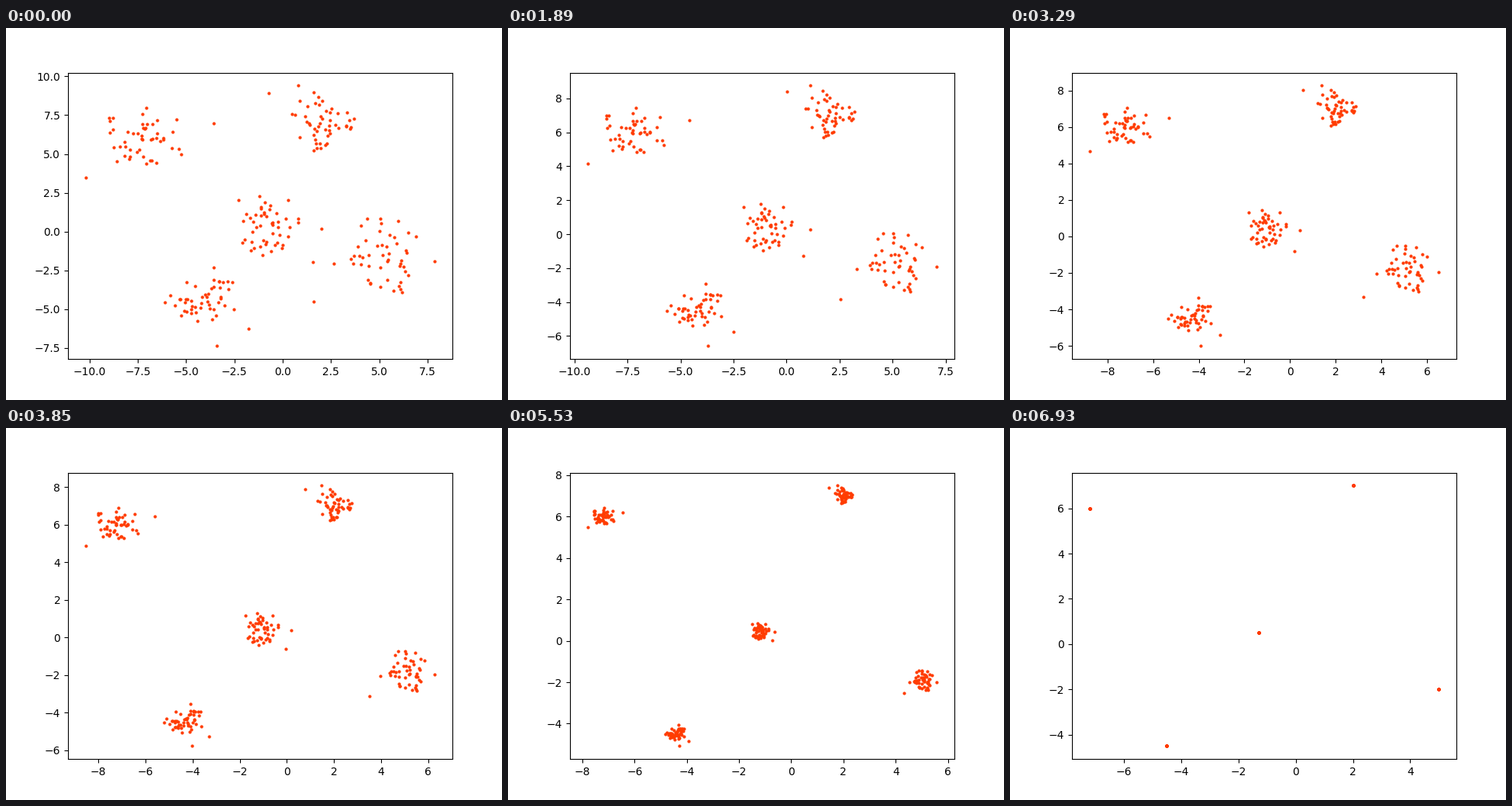
Write a matplotlib script that moves like this. It is 640x480 px and loops after 7000 ms.

```python
from collections import namedtuple

import numpy as np
import matplotlib.pyplot as plt
from matplotlib.animation import FuncAnimation

FRAMES = 100
INTERVAL = 70
PER_CLUSTER = 50
CUTOFF = 2.1  # widest random scatter, in standard deviations
MARGIN = 0.05

# centre: where the cluster collapses to; mean, spread: its random scatter;
# edge: outermost points, which set the axis limits
Cluster = namedtuple("Cluster", "centre mean spread edge")
CLUSTERS = [
    Cluster((2, 7), (1.95, 7.05), (0.9, 0.95), [(0.8, 9.4), (-0.73, 8.93)]),
    Cluster((-7.2, 6), (-7.2, 6.1), (1.1, 1.05), [(-10.212, 3.48), (-3.58, 6.98)]),
    Cluster((-1.3, 0.5), (-0.9, 0.45), (1.05, 1.1), [(1.56, -1.96), (2.01, 0.19)]),
    Cluster((-4.5, -4.5), (-4.35, -4.4), (1.0, 1.1), [(-3.42, -7.375), (-1.77, -6.25)]),
    Cluster((5, -2), (4.95, -1.6), (1.3, 1.3), [(7.88, -1.91), (1.6, -4.5)]),
]

rng = np.random.RandomState(7)


def scatter_cluster(cluster):
    """Edge points plus a normal cloud without its far tails."""
    z = rng.normal(size=(PER_CLUSTER * 3, 2))
    z = z[np.hypot(z[:, 0], z[:, 1]) < CUTOFF]
    cloud = z[:PER_CLUSTER - len(cluster.edge)] * cluster.spread + cluster.mean
    return np.vstack([cluster.edge, cloud])


def padded(values):
    lo, hi = values.min(), values.max()
    pad = MARGIN * (hi - lo)
    return lo - pad, hi + pad


start = np.vstack([scatter_cluster(c) for c in CLUSTERS])
centres = np.repeat([c.centre for c in CLUSTERS], PER_CLUSTER, axis=0)

fig, ax = plt.subplots(figsize=(6.4, 4.8), dpi=100)
dots = ax.scatter(start[:, 0], start[:, 1], s=4, c="#ff3c00")


def update(frame):
    scale = 1 - frame / (FRAMES - 1)
    points = centres + (start - centres) * scale
    dots.set_offsets(points)
    ax.set_xlim(padded(points[:, 0]))
    ax.set_ylim(padded(points[:, 1]))
    return (dots,)


anim = FuncAnimation(fig, update, frames=FRAMES, interval=INTERVAL,
                     init_func=lambda: update(0), repeat=True, repeat_delay=0)
plt.show()
```
